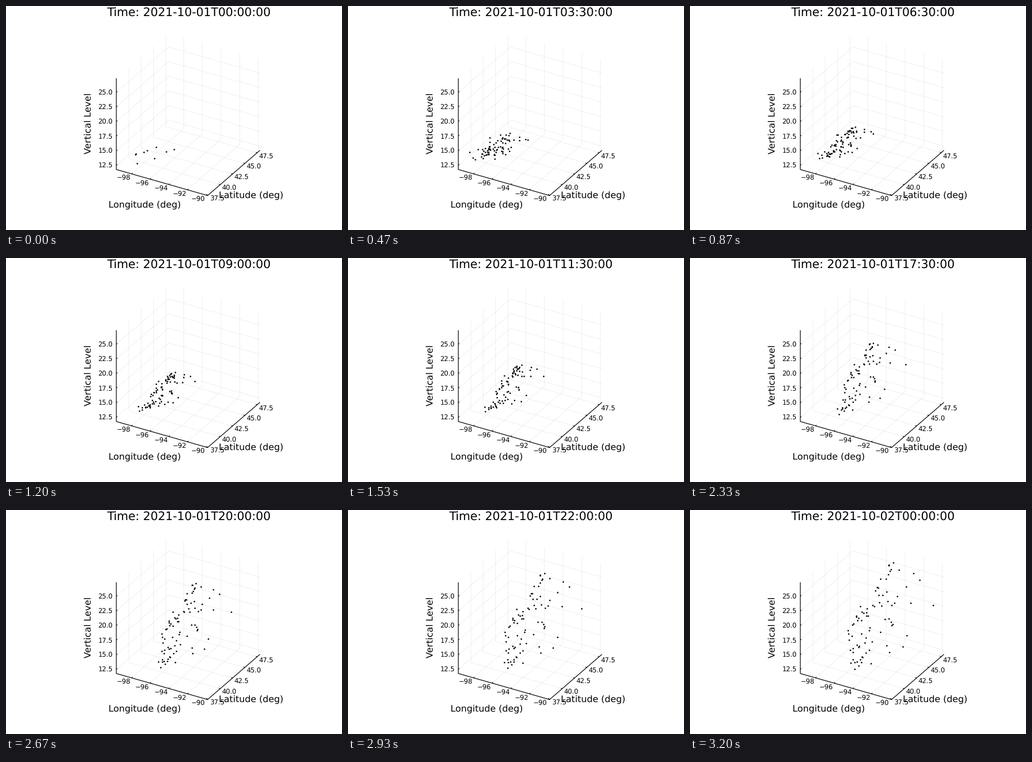
A matplotlib script for the animation above (3270 ms loop, 600 by 400 pixels).

```python
import numpy as np
import matplotlib.pyplot as plt
from matplotlib.animation import FuncAnimation
from matplotlib.collections import LineCollection

W, H, DPI = 600, 400, 100
TICK_MS, TICKS = 10, 327
PX = 72 / DPI

plt.rcParams.update({"font.family": "DejaVu Sans", "text.hinting": "none",
                     "path.snap": False})

fig = plt.figure(figsize=(W / DPI, H / DPI), dpi=DPI, facecolor="white")
ax = fig.add_axes([0, 0, 1, 1])
ax.set(xlim=(0, W), ylim=(H, 0))
ax.axis("off")


def text(x, y, s, size, ha="center", rotation=0):
    return ax.text(x, y, s, fontsize=size * PX, ha=ha, va="baseline",
                   rotation=rotation, rotation_mode="anchor")


def strokes(lines, width, **style):
    ax.add_collection(LineCollection(lines, colors="black",
                                     linewidths=width * PX, **style))


# --- axes box: corner plus one edge vector per dimension ---
corner = np.array([197.0, 292.0])
lon_edge = np.array([163.0, 46.5])
lat_edge = np.array([93.5, -80.8])
up_edge = np.array([0.0, -163.0])


def box(u, v, w):
    return corner + u * lon_edge + v * lat_edge + w * up_edge


def tick(p, direction):
    return [p, p + 2.3 * direction / np.hypot(*direction)]


grid, ticks = [], []
for i in range(5):
    u = (27 + 33.28 * i) / 163
    grid.append([box(u, 0, 0), box(u, 1, 0), box(u, 1, 1)])
    ticks.append(tick(box(u, 0, 0), lat_edge))
    text(210.2 + 33.3 * i, 311 + 9.5 * i, f"\u2212{98 - 2 * i}", 11.75)

    v = (0.5 + 22 * i) / 93.5
    grid.append([box(1, v, 0), box(0, v, 0), box(0, v, 1)])
    ticks.append(tick(box(1, v, 0), -lon_edge))
    text(377 + 22 * i, 348.2 - 19 * i, f"{37.5 + 2.5 * i:.1f}", 11.75)

for i in range(6):
    w = (7.5 + 26.1 * i) / 163
    grid.append([box(0, 0, w), box(0, 1, w), box(1, 1, w)])
    ticks.append(tick(box(0, 0, w), lat_edge))
    text(190.5, 289 - 26.1 * i, f"{12.5 + 2.5 * i:.1f}", 11.75, ha="right")

strokes(grid, 0.6, alpha=0.1, zorder=1)
strokes(ticks, 1.1)
strokes([[box(0, 0, 1), box(0, 0, 0), box(1, 0, 0), box(1, 1, 0)]], 1.2)
text(247.3, 360, "Longitude (deg)", 16.25)
text(437.2, 342.9, "Latitude (deg)", 16.3)
text(151.5, 209.2, "Vertical Level", 16.25, rotation=90)
title = text(326, 18.5, "", 20.85)

# --- plume: a spine that rises and leans, with particles spread across it ---
KEYS = [7, 27, 48]
SPINES = np.array([
    [(224, 266), (255, 264), (260, 254), (268, 246), (298, 230)],
    [(253, 274), (283, 251), (288, 223), (303, 199), (314, 178)],
    [(296, 283), (312, 240), (314, 196), (334, 165), (368, 90)],
])
motion = np.polyfit(KEYS, SPINES.reshape(3, -1), 2)

BATCH = 9
count = BATCH * 9
rng = np.random.default_rng(4)
along = (np.arange(count) + 0.5) / count
skew = np.exp(0.9 * np.clip(rng.normal(0, 0.75, count), -1.3, 1.3)) - 1
across = skew * (np.sin(np.pi * along) + 0.15)
jitter = rng.normal(size=(count, 2))
birth = rng.permutation(count) // BATCH


def plume(step):
    knots = (step ** np.arange(2, -1, -1) @ motion).reshape(-1, 2)
    knot_at = np.linspace(0, 1, len(knots))
    spine = np.stack([np.interp(along, knot_at, c) for c in knots.T], axis=1)
    width = 20 + 25 * (max(step - 7, 0) / 41) ** 2
    side = np.outer(across * width, (1, -0.1))
    return spine + side + jitter * (2 + 9 * np.exp(-step / 10))


dots = ax.scatter([], [], s=(2.7 * PX) ** 2, c="black", linewidths=0, zorder=4)


def draw(tick_no):
    step = (6 * tick_no + 3) // 40  # 15 steps a second, on a 10 ms clock
    dots.set_offsets(plume(step)[birth <= step])
    day, half = divmod(step, 48)
    title.set_text(f"Time: 2021-10-{1 + day:02d}T{half // 2:02d}:{half % 2 * 30:02d}:00")
    return dots, title


anim = FuncAnimation(fig, draw, frames=TICKS, interval=TICK_MS,
                     repeat=True, repeat_delay=0)
plt.show()
```
